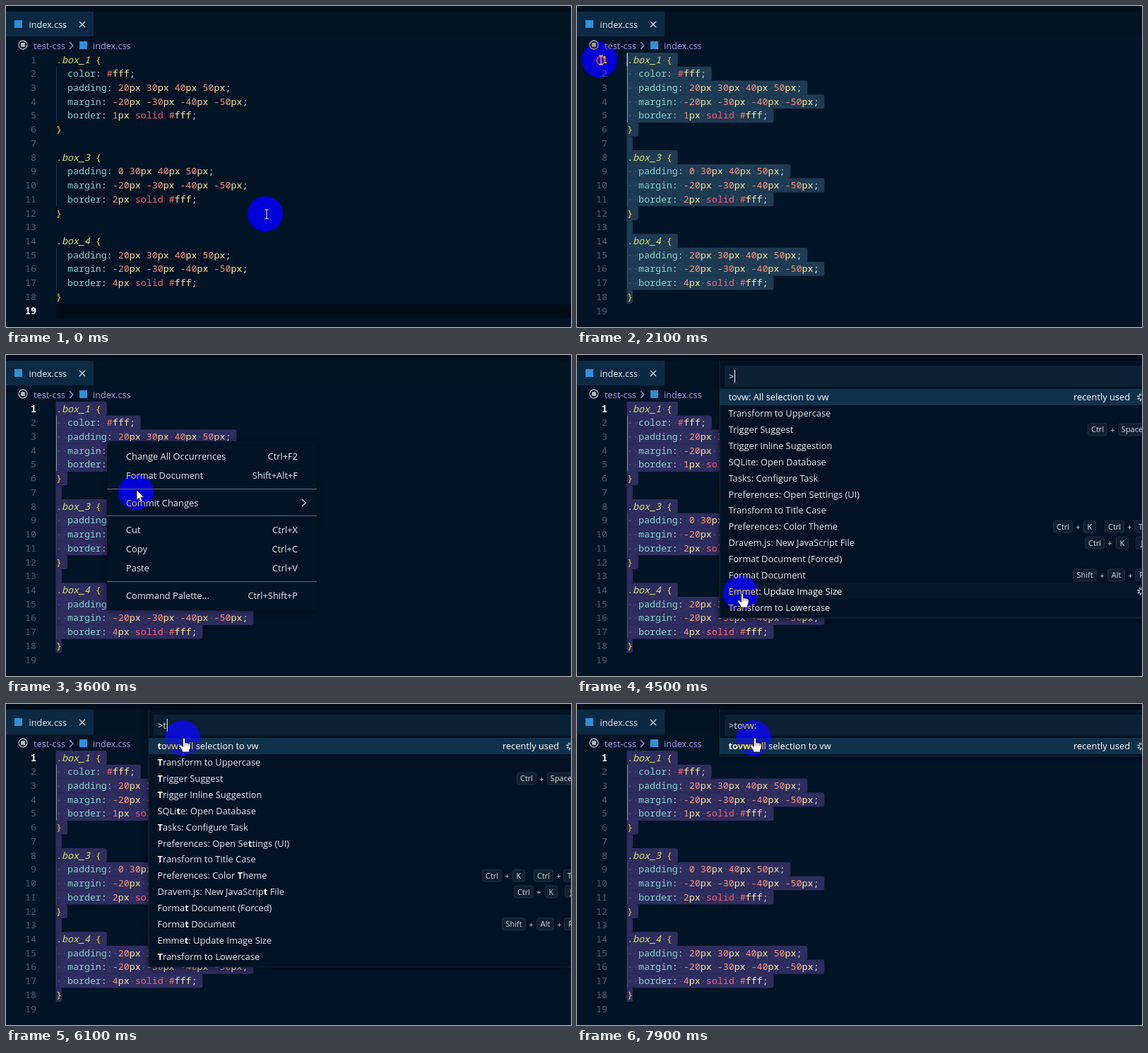
Recreate the animation shown at these times as an HTML page. Size 800 by 454 pixels, loop 8000 ms.

```html
<!DOCTYPE html>
<html lang="en">
<head>
<meta charset="utf-8">
<title>Editor</title>
<style>
  html, body { margin: 0; width: 100%; height: 100%; overflow: hidden; background: #011426; }
  svg { display: block; width: 100vw; height: 100vh; }
  text { white-space: pre; }
  .code { font: 500 13.3px "Noto Sans Mono", monospace; }
  .num { font: 13.3px "Noto Sans Mono", monospace; }
  .ui { font: 12.85px "Open Sans", sans-serif; fill: #e3e9f1; }
  .key { font: 11px "Open Sans", sans-serif; fill: #ccd6e1; }
  .b { font-weight: 700; fill: #fff; }
</style>
</head>
<body>
<svg id="stage" viewBox="0 0 800 454"></svg>
<script>
const stage = document.getElementById('stage');
const LOOP = 8000, STEP = 100;
const LEFT = 71, TOP = 76, CW = 7.98, LH = 19.72, ROW = 22.87;

const edge = px => `  margin: -20px -30px -40px -50px;\n  border: ${px}px solid #fff;\n}\n`;
const lines = ('.box_1 {\n  color: #fff;\n  padding: 20px 30px 40px 50px;\n' + edge(1) +
  '\n.box_3 {\n  padding: 0 30px 40px 50px;\n' + edge(2) +
  '\n.box_4 {\n  padding: 20px 30px 40px 50px;\n' + edge(4)).split('\n');
const END = { line: 17, col: 1 };
const blocks = [[1, 4], [8, 10], [14, 16]];

const menu = [
  [143, 'Change All Occurrences', 'Ctrl+F2'], [170, 'Format Document', 'Shift+Alt+F'],
  [209, 'Commit Changes', ''], [247, 'Cut', 'Ctrl+X'], [274, 'Copy', 'Ctrl+C'],
  [301, 'Paste', 'Ctrl+V'], [340, 'Command Palette...', 'Ctrl+Shift+P']
];
const commands = [
  'tovw: All selection to vw', 'Transform to Uppercase', 'Trigger Suggest',
  'Trigger Inline Suggestion', 'SQLite: Open Database', 'Tasks: Configure Task',
  'Preferences: Open Settings (UI)', 'Transform to Title Case', 'Preferences: Color Theme',
  'Dravem.js: New JavaScript File', 'Format Document (Forced)', 'Format Document',
  'Emmet: Update Image Size', 'Transform to Lowercase'
];
// Row, then [x, width, label] for each key of the chord
const chords = [
  [2, [723, 28, 'Ctrl'], [766, 40, 'Space']],
  [8, [674, 28, 'Ctrl'], [717, 18, 'K']],
  [8, [747, 28, 'Ctrl'], [789, 18, 'T']],
  [9, [719, 28, 'Ctrl'], [763, 18, 'K']],
  [9, [791, 18, 'J']],
  [11, [702, 34, 'Shift'], [751, 25, 'Alt'], [790, 18, 'F']]
];
// Pointer stops: time, x, y
const path = [
  [0, 367, 294], [100, 340, 262], [200, 265, 185], [300, 170, 120], [400, 88, 160],
  [500, 80, 310], [600, 105, 421], [1600, 105, 421], [1700, 96, 375], [1900, 54, 190],
  [2000, 38, 105], [2100, 32, 76], [2500, 32, 76], [3100, 140, 122], [3400, 140, 122],
  [3600, 184, 194], [4000, 232, 337], [4500, 232, 337], [4900, 246, 95], [5200, 246, 95],
  [5300, 250, 48], [LOOP, 250, 48]
];
const typing = [[7900, 'tovw:'], [7300, 'tovw'], [6800, 'tov'], [6100, 't'], [0, '']];

const clamp = (v, a, b) => Math.max(a, Math.min(b, v));
const rect = (x, y, w, h, fill, more = '') =>
  `<rect x="${x}" y="${y}" width="${w}" height="${h}" fill="${fill}" ${more}/>`;
const text = (x, y, s, cls = 'ui', more = '') =>
  `<text class="${cls}" x="${x}" y="${y + 4.6}" ${more}>${s}</text>`;
const stroke = (d, color, w = 1.2) => `<path d="${d}" fill="none" stroke="${color}" stroke-width="${w}"/>`;
const span = (s, fill, more = '') => `<tspan fill="${fill}" ${more}>${s}</tspan>`;
const bold = s => `<tspan class="b">${s}</tspan>`;
const lineY = i => TOP + i * LH;
const rowY = i => 59.7 + i * ROW;

function pointerAt(t) {
  const i = path.findIndex(p => p[0] > t);
  const a = path[i - 1], b = path[i], k = (t - a[0]) / (b[0] - a[0]);
  return { x: a[1] + (b[1] - a[1]) * k, y: a[2] + (b[2] - a[2]) * k };
}

function paint(line) {
  if (line[0] === '.') return span('.box_' + line[5], '#d6e06c', 'font-style="italic"') + span(' {', '#ffd32a');
  if (line === '}') return span(line, '#ffd32a');
  return line.replace(/(\w+)(?=:)|#fff|(-?\d+)(px)?|solid|[:;]/g, (m, prop, num, unit) =>
    prop ? span(m, '#86d3cc') :
    num ? span(num, '#f9907a') + (unit ? span(unit, '#ffeb95') : '') :
    m === '#fff' ? span('#', '#ff6b63') + span('fff', '#ffeb95') :
    m === 'solid' ? span(m, '#ff5874') : span(m, '#d6deeb'));
}
const painted = lines.map(paint);

const chrome = rect(0, 0, 800, 454, '#011426') + rect(0, 0, 800, 43, '#011221') +
  rect(0, 0, 800, 8, '#010f1c') + rect(0, 8, 124, 35, '#0b2942') +
  rect(12, 20, 11, 11, '#2f8fd8') + text(32.5, 26.5, 'index.css', 'ui', 'style="font-size:12.6px"') +
  stroke('M104 22l8 8m0-8l-8 8', '#d6deeb') +
  `<circle cx="24" cy="55" r="6" fill="none" stroke="#aeb9c4" stroke-width="1.3"/><circle cx="24" cy="55" r="3.2" fill="#aeb9c4"/>` +
  text(39, 56, 'test-css', 'ui', 'style="fill:#a599e9"') + stroke('M90 51l5 5-5 5', '#a599e9') +
  rect(104, 50, 11, 11, '#2f8fd8') +
  text(123, 56, 'index.css', 'ui', 'style="fill:#a599e9;font-size:12.6px"');

function caretAt(t, p) {
  if (t < 1000) return { line: 18, col: 0 };
  if (t < 1700) return END;
  if (t >= 2100) return { line: 0, col: 0 };
  const line = clamp(Math.round((p.y - TOP) / LH), 0, 17);
  return { line, col: clamp(Math.round((p.x - LEFT) / CW), 0, lines[line].length) };
}

// Selection bar, rounded on the right only
function bar(x, y, w, fill) {
  const r = Math.min(3, w);
  return `<path d="M${x} ${y}h${w - r}q${r} 0 ${r} ${r}v${LH + .3 - 2 * r}q0 ${r} ${-r} ${r}h${r - w}z" fill="${fill}"/>`;
}

function editor(t, p) {
  const caret = caretAt(t, p), selected = t >= 1700, blurred = t >= 3100;
  let out = '';
  if (!selected) out += rect(LEFT, lineY(caret.line) - 9.8, 729, LH, '#010b17');
  if (selected) lines.forEach((line, i) => {
    if (i < caret.line || i > END.line) return;
    const y = lineY(i), from = i === caret.line ? caret.col : 0;
    const to = line.length + (i < END.line ? 1 : 0);
    out += bar(LEFT - .5 + from * CW, y - 10, Math.max(0, to - from) * CW + .5, blurred ? '#2d2d5e' : '#1d3b53');
    const dots = [...line].map((c, k) => c === ' ' && k >= from ? '·' : ' ').join('');
    out += text(LEFT, y, dots, 'code', `fill="${blurred ? '#555c86' : '#48677d'}"`);
  });
  for (const [a, b] of blocks) {
    const on = selected && caret.line >= a - 1 && caret.line <= b + 1;
    out += rect(LEFT, lineY(a) - 10, 1, (b - a + 1) * LH, on ? '#8797a6' : '#5e7e9750');
  }
  lines.forEach((line, i) => {
    const active = i === caret.line;
    out += text(43, lineY(i), i + 1, 'num', `text-anchor="end" fill="${active ? '#fff' : '#465d70'}" ${active ? 'style="font-weight:600"' : ''}`);
    out += text(LEFT, lineY(i), painted[i], 'code', 'fill="#d6deeb"');
  });
  if (t >= 1000 && !blurred) out += rect(LEFT + caret.col * CW - .5, lineY(caret.line) - 9.5, 1.5, 19, '#a9bccb');
  return out;
}

function contextMenu(p) {
  let out = rect(143, 122, 297, 239, '#011426', 'style="filter:drop-shadow(0 1px 4px #0008)"');
  for (const [y, label, keys] of menu) {
    if (p.x > 143 && Math.abs(p.y - y) < 13) out += rect(143, y - 13.5, 297, 27, '#11304a');
    out += text(170, y, label) + text(413, y, keys, 'ui', 'text-anchor="end"');
  }
  for (const y of [189, 227, 320]) out += rect(143, y, 297, 1, '#60707d');
  return out + stroke('M419 204l5.5 5-5.5 5', '#d3dbe6');
}

const gear = y => `<circle cx="799" cy="${y}" r="4.5" fill="none" stroke="#aab7c4" stroke-width="2.4" stroke-dasharray="2 1.53"/>` +
  `<circle cx="799" cy="${y}" r="3" fill="none" stroke="#aab7c4"/>`;

function palette(t, p) {
  const query = typing.find(k => t >= k[0])[1];
  const rows = query.length > 1 ? commands.slice(0, 1) : commands;
  const hover = Math.round((p.y - rowY(0)) / ROW);
  let out = rect(202, 8, 610, rows.length > 1 ? 364 : 66, '#011224', 'style="filter:drop-shadow(0 0 4px #000b)"') +
    stroke(`M202 8V${rows.length > 1 ? 372 : 74}H800`, '#14293b', 1) +
    rect(209, 15, 600, 30, '#0a2033') + text(215, 30, '&gt;' + query) +
    rect(202, 48, 598, 23, '#10314b');
  rows.forEach((label, i) => {
    const y = rowY(i);
    if (i && i === hover) out += rect(202, y - 11.4, 598, ROW, '#051829') + gear(y);
    const marked = !query ? label : i ? label.replace(/t/i, bold) : bold(query) + label.slice(query.length);
    out += text(214.5, y, marked, 'ui', i === 0 || i === hover ? 'style="fill:#fff"' : '');
  });
  out += text(703, rowY(0), 'recently used', 'ui', 'style="fill:#fff"') + gear(rowY(0));
  if (rows.length > 1) for (const [row, ...keys] of chords) {
    const y = rowY(row);
    keys.forEach(([x, w, label], i) => {
      out += rect(x + .5, y - 8.5, w - 1, 17, '#10202f', 'rx="3" stroke="#1c3042"') +
        text(x + w / 2, y - .6, label, 'key', 'text-anchor="middle"');
      if (i < keys.length - 1) out += text(x + w + 7.5, y, '+', 'key', 'text-anchor="middle"');
    });
  }
  if (t < 7900) out += rect(223 + [0, 4.8, 0, 19, 29][query.length], 21, 1, 18, '#fff');
  return out;
}

function pointer(t, p) {
  const at = (dx, dy, body) => `<g transform="translate(${p.x + dx} ${p.y + dy})">${body}</g>`;
  let out = `<circle cx="${p.x}" cy="${p.y}" r="25" fill="#0014ff" style="mix-blend-mode:difference"/>`;
  if (t >= 1000 && t < 2600) out += `<circle cx="${p.x + 1.5}" cy="${p.y + 1}" r="5.5" fill="none" stroke="#e8391c" stroke-width="2"/>`;
  if (t < 3100) return out + at(2, .5, stroke('M-3-6.5H-1L0-5.5L1-6.5H3M0-5.5V5.5M-3 6.5H-1L0 5.5L1 6.5H3', '#e6e3cf', 1.1));
  if (t < 4400) return out + at(1, -3, '<path d="M0 0V14.5L3.4 11.3L5.8 16.8L8.2 15.7L5.8 10.4H10.4Z" fill="#fff" stroke="#111" stroke-width=".7"/>');
  return out + at(2, 0,
    '<path d="M-1.5 1.2Q0-1 1.5 1.2V7Q3 5.8 4 7.3Q5.5 6.3 6.5 8Q8.6 7 9 9.3V14L7.5 17V20H-2.5V17.4L-6.8 11.5Q-6.8 9-4.3 10L-1.5 12.6Z" fill="#fff" stroke="#111" stroke-width=".8"/>' +
    stroke('M1.5 7V11M4 7.4V11.2M6.5 8.2V11.4', '#444', .6));
}

function draw(t) {
  const p = pointerAt(t);
  const popup = t < 3100 ? '' : t < 4400 ? contextMenu(p) : palette(t, p);
  stage.innerHTML = chrome + editor(t, p) + popup + pointer(t, p);
}

let last = -1;
const start = performance.now();
function tick() {
  const t = Math.floor(Math.max(0, performance.now() - start) % LOOP / STEP) * STEP;
  if (t !== last) draw(last = t);
  requestAnimationFrame(tick);
}
tick();
</script>
</body>
</html>
```
